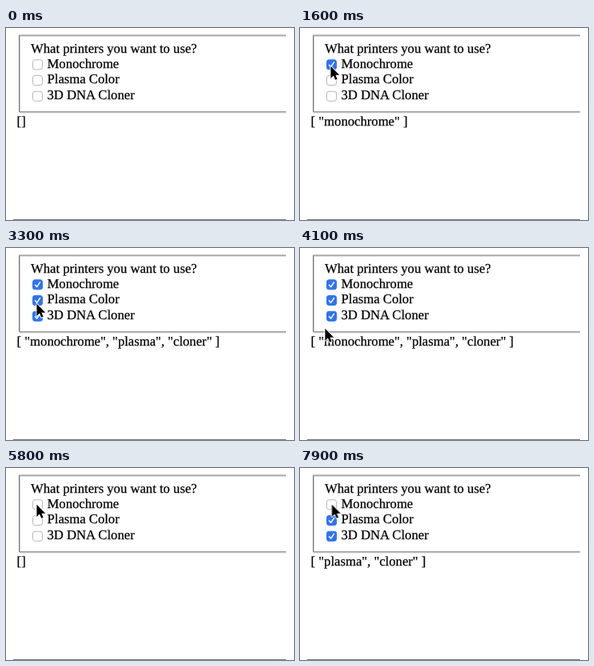
An HTML page that plays this animation: 360 by 240 pixels, repeating every 8 s.

```html
<!DOCTYPE html>
<html lang="en">
<head>
<meta charset="utf-8">
<title>Printer picker</title>
<style>
html, body { margin: 0; width: 100%; height: 100%; overflow: hidden; background: #fff; }
svg { display: block; }
text {
  font: 16.67px "Liberation Serif", "Times New Roman", serif;
  font-kerning: normal;
  text-rendering: geometricPrecision;
  white-space: pre;
  stroke: #000;
  stroke-width: .25px;
}
.dark { stroke: #777; }
.light { stroke: #c8c8c8; }

#mono, #plasma, #cloner, #lines, #cursor { animation: 8s step-end infinite; }
#mono { animation-name: mono; }
#plasma { animation-name: plasma; }
#cloner { animation-name: cloner; }
#lines { animation-name: lines; }
#cursor { animation-name: cursor; }

/* fill and stroke paint the box, color paints the tick */
@keyframes mono {
  0%, 72.5%, 100% { fill: #fff; stroke: #b8b8b8; color: transparent; }
  18.75% { fill: #e4e4e4; stroke: #a4a4a4; color: transparent; }
  20% { fill: #2f74f2; stroke: #2f74f2; color: #fff; }
  71.25% { fill: #2560d2; stroke: #2560d2; color: #fff; }
}
@keyframes plasma {
  0%, 57.5%, 100% { fill: #fff; stroke: #b8b8b8; color: transparent; }
  25%, 83.75% { fill: #e4e4e4; stroke: #a4a4a4; color: transparent; }
  26.25%, 85% { fill: #2f74f2; stroke: #2f74f2; color: #fff; }
}
@keyframes cloner {
  0%, 62.5%, 100% { fill: #fff; stroke: #b8b8b8; color: transparent; }
  32.5%, 92.5% { fill: #e4e4e4; stroke: #a4a4a4; color: transparent; }
  35%, 95% { fill: #2f74f2; stroke: #2f74f2; color: #fff; }
}

/* each value of the list sits on its own 30px row */
@keyframes lines {
  0%, 72.5%, 100% { transform: translateY(0); }
  20%, 62.5% { transform: translateY(-30px); }
  26.25% { transform: translateY(-60px); }
  35% { transform: translateY(-90px); }
  57.5% { transform: translateY(-120px); }
  85% { transform: translateY(-150px); }
  95% { transform: translateY(-180px); }
}

/* the pointer is sampled ten times a second */
@keyframes cursor {
  0%, 100% { transform: translate(400px, 300px); }
  1.25% { transform: translate(238px, 176px); animation-timing-function: steps(3); }
  5% { transform: translate(120px, 84px); animation-timing-function: steps(2); }
  7.5% { transform: translate(66px, 35px); }
  8.75% { transform: translate(57px, 29px); animation-timing-function: steps(2); }
  11.25% { transform: translate(49px, 48px); animation-timing-function: steps(2); }
  13.75% { transform: translate(42px, 63px); animation-timing-function: steps(2); }
  16.25% { transform: translate(38px, 47px); }
  22.5% { transform: translate(38px, 47px); animation-timing-function: steps(2); }
  25% { transform: translate(36px, 64px); }
  27.5% { transform: translate(36px, 64px); animation-timing-function: steps(2); }
  30% { transform: translate(35px, 79px); animation-timing-function: steps(2); }
  32.5% { transform: translate(36px, 83px); }
  35% { transform: translate(36px, 83px); animation-timing-function: steps(5); }
  41.25% { transform: translate(38px, 69px); animation-timing-function: steps(3); }
  45% { transform: translate(39px, 46px); animation-timing-function: steps(5); }
  51.25% { transform: translate(31px, 100px); animation-timing-function: steps(4); }
  56.25% { transform: translate(39px, 56px); }
  57.5% { transform: translate(39px, 64px); }
  60% { transform: translate(40px, 75px); animation-timing-function: steps(2); }
  62.5% { transform: translate(38px, 82px); }
  63.75% { transform: translate(38px, 82px); animation-timing-function: steps(5); }
  70% { transform: translate(38px, 45px); }
  73.75% { transform: translate(38px, 45px); animation-timing-function: steps(6); }
  81.25% { transform: translate(43px, 67px); }
  85% { transform: translate(43px, 67px); animation-timing-function: steps(5); }
  91.25% { transform: translate(38px, 83px); }
  95% { transform: translate(38px, 83px); animation-timing-function: steps(3); }
  98.75% { transform: translate(39.5px, 45px); }
}
</style>
</head>
<body>
<svg width="360" height="240" viewBox="0 0 360 240">
  <defs>
    <g id="box">
      <rect x=".5" y=".5" width="12" height="12" rx="2.6"/>
      <path d="M3.5 6.9 5.6 9.3 9.5 3.6" fill="none" stroke="currentColor" stroke-width="1.5" stroke-linecap="round" stroke-linejoin="round"/>
    </g>
  </defs>

  <path class="light" fill="none" d="M350 10.1H17.5V105.8H350"/>
  <path class="dark" fill="none" d="M350 9.1H16.5V104.8H350"/>
  <path class="dark" d="M9 239.5H350"/>

  <text x="31" y="31">What printers you want to use?</text>
  <text x="51.5" y="49.7">Monochrome</text>
  <text x="51.5" y="69">Plasma Color</text>
  <text x="51.5" y="88.8">3D DNA Cloner</text>

  <g id="mono"><use href="#box" x="33" y="39.3"/></g>
  <g id="plasma"><use href="#box" x="33" y="59"/></g>
  <g id="cloner"><use href="#box" x="33" y="78.8"/></g>

  <svg y="107" width="360" height="24" overflow="hidden">
    <g id="lines">
      <text x="13.6" y="14.5">[]</text>
      <text x="13.6" y="44.5">[ "monochrome" ]</text>
      <text x="13.6" y="74.5">[ "monochrome", "plasma" ]</text>
      <text x="13.6" y="104.5">[ "monochrome", "plasma", "cloner" ]</text>
      <text x="13.6" y="134.5">[ "monochrome", "cloner" ]</text>
      <text x="13.6" y="164.5">[ "plasma" ]</text>
      <text x="13.6" y="194.5">[ "plasma", "cloner" ]</text>
    </g>
  </svg>

  <g id="cursor">
    <path d="M.4 .8V15.9L3.9 12.6 6.2 17.8 8.6 16.8 6.4 11.7H11.2Z" stroke="#fff" stroke-width="1.8" stroke-linejoin="round" paint-order="stroke"/>
  </g>
</svg>
</body>
</html>
```
